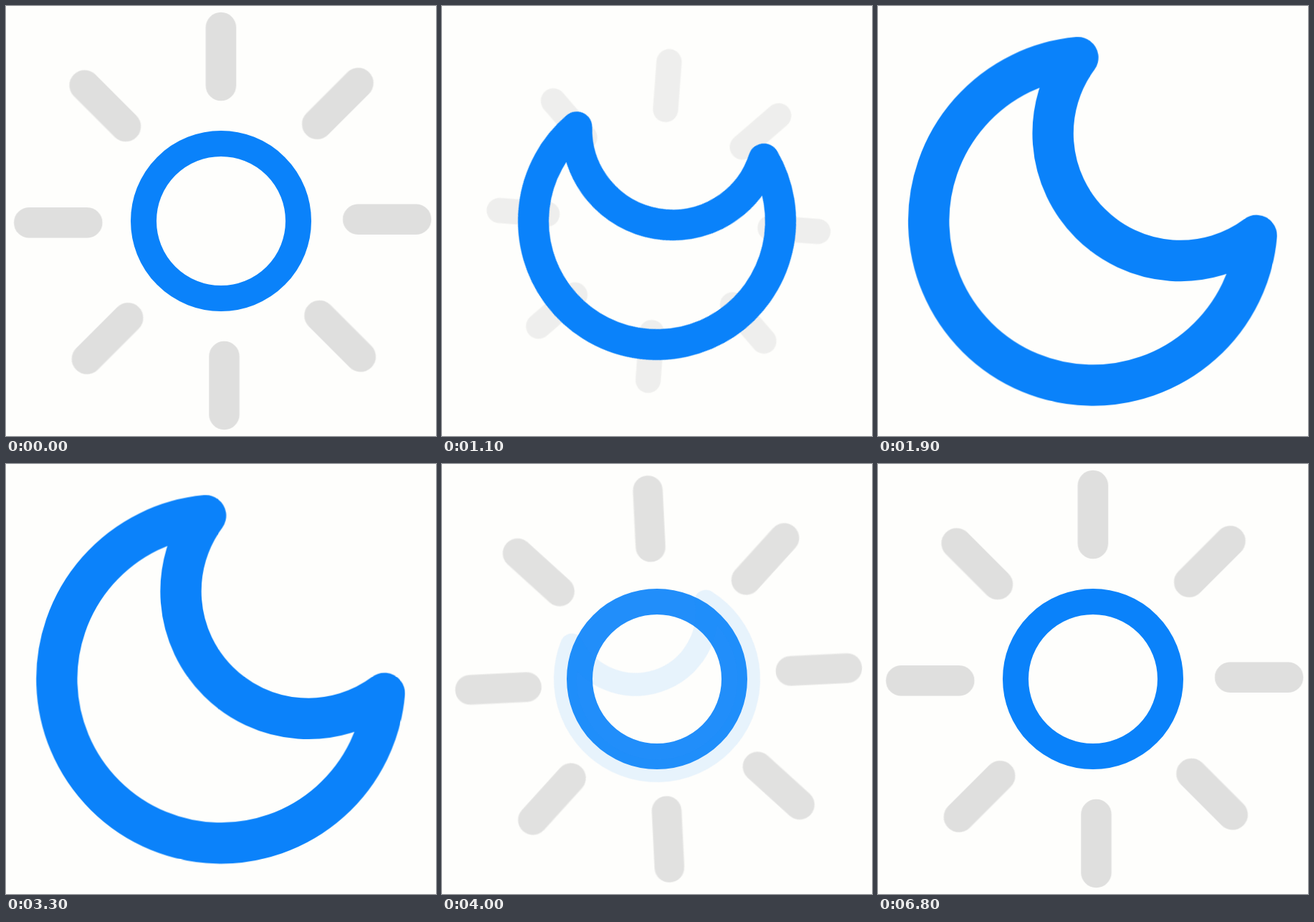
Write an HTML page without scripts that moves like this. It is 600 by 600 pixels and loops after 7000 ms.

```html
<!DOCTYPE html>
<html lang="en">
<head>
<meta charset="utf-8">
<title>Sun and moon</title>
<style>
  html, body { margin: 0; width: 100%; height: 100%; overflow: hidden; background: #fefefc; }
  svg { display: block; width: 100%; height: 100%; fill: none; }
  /* every move eases out; holds are unaffected */
  .rays, .sun, .moon { animation: 7s cubic-bezier(.3333, 1, .6667, 1) infinite both; }
  .rays { stroke: #dfdfde; stroke-width: 42.5; stroke-linecap: round; animation-name: rays; }
  .sun { stroke: #0a82fa; stroke-width: 36; animation-name: sun; }
  .moon {
    stroke: #0a82fa; stroke-width: 57.4; stroke-linejoin: round;
    transform-origin: 300px 300px;
    animation-name: moon, moon-fade;
  }

  /* night falls at 880 ms, day returns at 3300 ms */
  @keyframes rays {
    0%, 12.571% { transform: rotate(0deg) scale(1); opacity: 1; }
    29% { transform: rotate(9deg) scale(.63); opacity: 0; }
    29.01%, 47.143% { transform: rotate(-47deg) scale(.6); opacity: 0; }
    63.571%, 100% { transform: rotate(0deg) scale(1); opacity: 1; }
  }
  @keyframes sun {
    0%, 12.57% { opacity: 1; }
    12.571%, 47.143% { opacity: 0; }
    65.714%, 100% { opacity: 1; }
  }
  @keyframes moon {
    0%, 12.571% { transform: rotate(-67deg) scale(.53); }
    29%, 47.143% { transform: rotate(0deg) scale(1); }
    63.571%, 100% { transform: rotate(-67deg) scale(.53); }
  }
  @keyframes moon-fade {
    0%, 12.57% { opacity: 0; }
    12.571%, 47.143% { opacity: 1; }
    65.714%, 100% { opacity: 0; }
  }
</style>
</head>
<body>
<svg viewBox="0 0 600 600">
  <defs>
    <path id="ray" d="M-2.3 -270V-189"/>
    <g id="pair">
      <use href="#ray"/>
      <use href="#ray" transform="rotate(180)"/>
    </g>
  </defs>
  <g transform="translate(302.25 300)">
    <g class="rays">
      <use href="#pair"/>
      <use href="#pair" transform="rotate(45)"/>
      <use href="#pair" transform="rotate(90)"/>
      <use href="#pair" transform="rotate(135)"/>
    </g>
  </g>
  <circle class="sun" cx="300" cy="300" r="108"/>
  <path class="moon" d="M279.3 71.7A229.3 229.3 0 1 0 528.3 320.7A178 178 0 0 1 279.3 71.7Z"/>
</svg>
</body>
</html>
```
